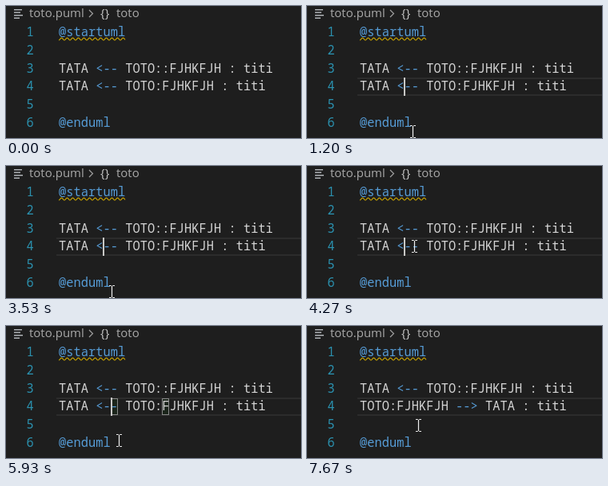
Recreate the animation shown at these times as an HTML page with a canvas. Size 369 by 166 pixels, loop 8000 ms.

```html
<!DOCTYPE html>
<html lang="en">
<head>
<meta charset="utf-8">
<title>Editor</title>
<style>
  html, body { margin: 0; width: 100%; height: 100%; overflow: hidden; background: #1e1e1e; }
  canvas { display: block; width: 369px; height: 166px; }
</style>
</head>
<body>
<canvas id="stage"></canvas>
<script>
const W = 369, H = 166, LOOP = 8000;
const LEFT = 66, CHAR = 9.24, LINE = 22.75, ROW_TOP = 90, ROW_BOTTOM = 113;
const PLAIN = '#d4d4d4', BLUE = '#569cd6', GOLD = '#ffd700', NUMBER = '#2b91af';
const CODE = '15.4px "Noto Sans Mono", monospace';
const LABEL = '15px "Open Sans", sans-serif';

const canvas = document.getElementById('stage');
const ctx = canvas.getContext('2d');
const ratio = window.devicePixelRatio || 1;
canvas.width = W * ratio;
canvas.height = H * ratio;

const colX = col => LEFT + col * CHAR;
const baseline = line => 38 + (line - 1) * LINE;
const within = (t, from, to) => t >= from && t < to;

// Pointer positions: time, x, y
const path = [
  [130, 203, 160], [270, 184, 128], [400, 150, 106], [530, 127, 101],
  [630, 126, 101], [730, 181, 76], [1000, 181, 76], [1200, 132, 158],
  [3530, 132, 158], [3870, 133, 128], [4130, 134, 103], [4270, 134, 101],
  [4400, 134, 101], [4670, 141, 144], [6200, 141, 144], [6470, 146, 124],
  [6800, 139, 104], [7000, 141, 102], [7330, 141, 102], [7670, 139, 125]
];

// Caret visible: from, to, column
const caretSpans = [
  [630, 1270, 6], [1530, 2000, 6], [2470, 3000, 6], [3200, 3700, 6],
  [4200, 4400, 6], [4400, 5470, 7], [5930, 6470, 7], [6900, 7470, 8]
];

// Matching bracket boxes: from, to, first column
const bracketSpans = [[1670, 3270, 6], [4930, 6000, 7]];

function pointerAt(t) {
  if (t < path[0][0]) return null;
  for (let i = 1; i < path.length; i++) {
    const [t0, x0, y0] = path[i - 1], [t1, x1, y1] = path[i];
    if (t < t1) {
      const k = (t - t0) / (t1 - t0);
      return [x0 + (x1 - x0) * k, y0 + (y1 - y0) * k];
    }
  }
  return path[path.length - 1].slice(1);
}

function rowParts(t) {
  const tail = [' TOTO:FJHKFJH : titi', PLAIN];
  if (within(t, 1530, 3200)) {
    const bracket = t < 1600 ? PLAIN : GOLD;
    return [['TATA <', PLAIN], ['[', bracket], ['hidden', PLAIN], [']', bracket], ['--', PLAIN], tail];
  }
  if (within(t, 4870, 5930)) {
    return [['TATA ', PLAIN], ['<-', BLUE], ['[', GOLD], ['hidden', BLUE], [']', GOLD], ['-', BLUE], tail];
  }
  if (t >= 7330) return [['TOTO:FJHKFJH ', PLAIN], ['-->', BLUE], [' TATA : titi', PLAIN]];
  return [['TATA ', PLAIN], ['<--', BLUE], tail];
}

function drawCode(line, parts) {
  ctx.font = CODE;
  let col = 0;
  for (const [text, color] of parts) {
    ctx.fillStyle = color;
    for (const ch of text) ctx.fillText(ch, colX(col++), baseline(line));
  }
}

function drawHeader() {
  ctx.fillStyle = '#b8bcc0';
  [10, 8, 11, 7].forEach((w, i) => ctx.fillRect(10, 4 + i * 3.5, w, 1.4));
  ctx.font = LABEL;
  ctx.fillStyle = '#a9a9a9';
  ctx.fillText('toto.puml', 29, 14);
  ctx.fillText('toto', 138, 14);
  ctx.fillStyle = '#c5c5c5';
  ctx.fillText('{}', 118, 14);
  ctx.strokeStyle = '#a0a0a0';
  ctx.lineWidth = 1.2;
  ctx.beginPath();
  ctx.moveTo(104, 5);
  ctx.lineTo(108.5, 9.5);
  ctx.lineTo(104, 14);
  ctx.stroke();
}

function drawSquiggle() {
  ctx.strokeStyle = '#cca700';
  ctx.lineWidth = 1.2;
  ctx.beginPath();
  for (let x = LEFT; x <= colX(9); x += 0.5) {
    ctx.lineTo(x, 41.5 + 1.4 * Math.cos((x - LEFT) * Math.PI / 3.5));
  }
  ctx.stroke();
}

function drawBracketBox(col) {
  const x = Math.round(colX(col)) + 0.5;
  ctx.fillStyle = 'rgba(0, 100, 0, 0.1)';
  ctx.fillRect(x, 91, 9, 21);
  ctx.strokeStyle = '#888888';
  ctx.lineWidth = 1;
  ctx.strokeRect(x, 91.5, 8, 20);
}

function drawPointer(x, y) {
  ctx.save();
  ctx.translate(Math.round(x) + 0.5, Math.round(y));
  ctx.strokeStyle = '#f0f0f0';
  ctx.lineWidth = 1.2;
  ctx.beginPath();
  ctx.moveTo(0, -7);
  ctx.lineTo(0, 7);
  for (const end of [-7.5, 7.5]) {
    ctx.moveTo(-3.5, end);
    ctx.lineTo(-0.7, end);
    ctx.moveTo(0.7, end);
    ctx.lineTo(3.5, end);
  }
  ctx.stroke();
  ctx.restore();
}

function draw(t) {
  ctx.setTransform(ratio, 0, 0, ratio, 0, 0);
  ctx.fillStyle = '#1e1e1e';
  ctx.fillRect(0, 0, W, H);
  drawHeader();

  if (t >= 630) {
    ctx.fillStyle = '#2c2c2c';
    ctx.fillRect(63, ROW_TOP, W - 63, 2);
    ctx.fillRect(63, ROW_BOTTOM - 2, W - 63, 2);
  }
  for (const [from, to, col] of bracketSpans) {
    if (within(t, from, to)) [col, col + 7].forEach(drawBracketBox);
  }

  ctx.font = CODE;
  ctx.fillStyle = NUMBER;
  for (let n = 1; n <= 6; n++) ctx.fillText(n, 25.5, baseline(n));

  drawCode(1, [['@startuml', BLUE]]);
  drawSquiggle();
  drawCode(3, [['TATA ', PLAIN], ['<--', BLUE], [' TOTO::FJHKFJH : titi', PLAIN]]);
  drawCode(4, rowParts(t));
  drawCode(6, [['@enduml', BLUE]]);

  const caret = caretSpans.find(([from, to]) => within(t, from, to));
  if (caret) {
    ctx.fillStyle = '#c8c8c6';
    ctx.fillRect(Math.round(colX(caret[2])), ROW_TOP, 2, ROW_BOTTOM - ROW_TOP);
  }
  const pointer = pointerAt(t);
  if (pointer) drawPointer(...pointer);
}

const start = performance.now();
function frame() {
  draw((performance.now() - start) % LOOP);
  requestAnimationFrame(frame);
}
frame();
</script>
</body>
</html>
```
